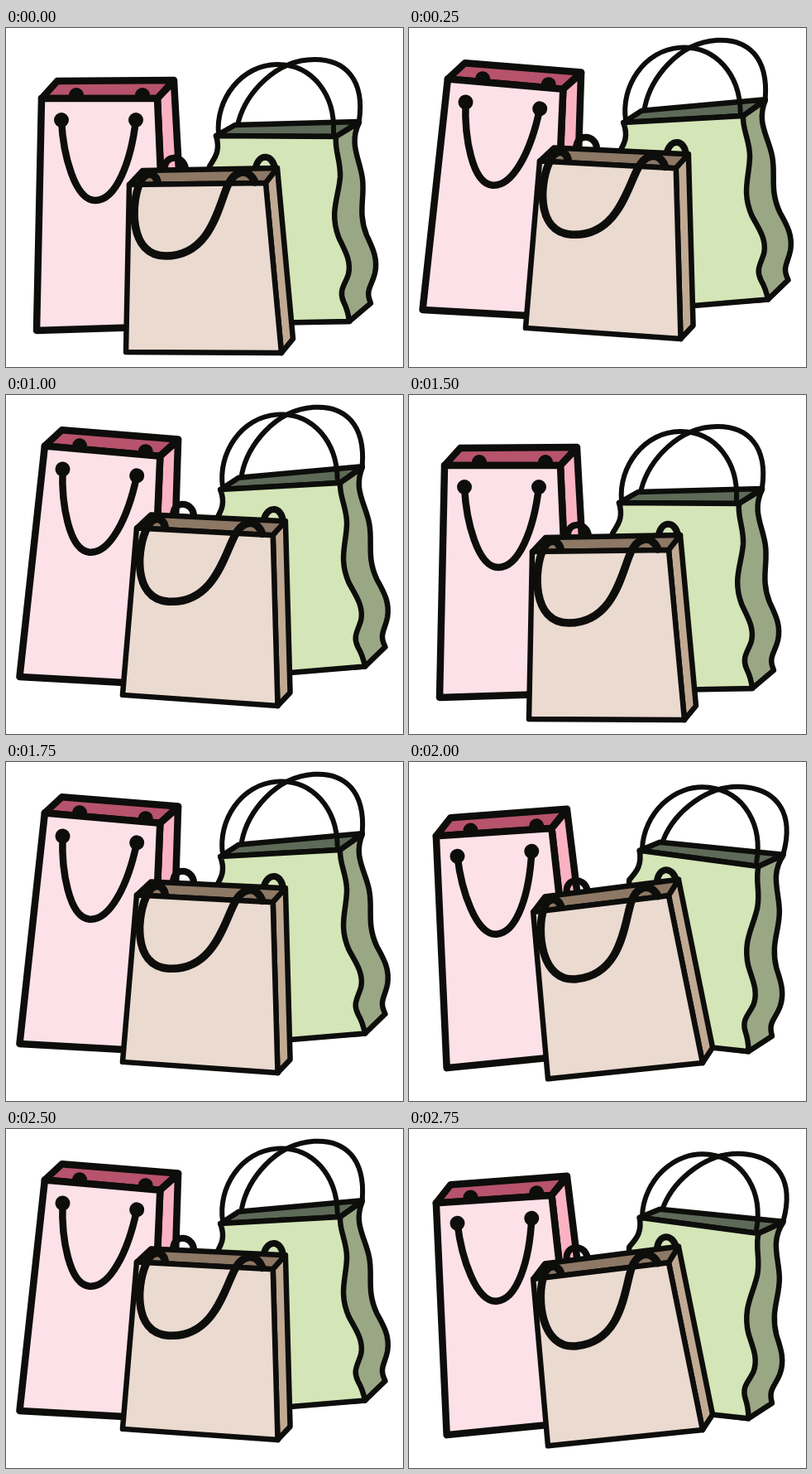
An HTML page that plays this animation: 480x409 px, repeating every 3000 ms.

```html
<!DOCTYPE html>
<html lang="en">
<head>
<meta charset="utf-8">
<title>Shopping bags</title>
<style>
  html, body { margin: 0; width: 100%; height: 100%; overflow: hidden; background: #fff; }
  svg { display: block; width: 100%; height: 100%; }
  .bag { stroke: #0d0d0b; stroke-linejoin: round; stroke-linecap: round; }
  .handle { fill: none; }
  .dot { fill: #0d0d0b; stroke: none; }
</style>
</head>
<body>
<svg viewBox="0 0 480 409">
  <g class="bag" id="pink" stroke-width="8.5">
    <path fill="#b7536c" d="M43 85L62 64L203 63L183 85Z"/>
    <circle class="dot" cx="85" cy="81" r="9"/>
    <circle class="dot" cx="165" cy="81" r="9"/>
    <path fill="#fbb3c4" d="M183 85L203 64L210 190L210 330L195 340Z"/>
    <path fill="#fde1e9" d="M43 85L183 85L195 360L37 365Z"/>
    <path class="handle" d="M67 111C69 152 83 208 108 208C133 208 151 162 157 111"/>
    <circle class="dot" cx="67" cy="111" r="9"/>
    <circle class="dot" cx="157" cy="111" r="9"/>
  </g>
  <g class="bag" id="green" stroke-width="6.5">
    <path fill="#5e6a58" d="M254 130L277 117L427 113L399 131Z"/>
    <path fill="#9aa785" d="M399 131L427 114C414 140 428 158 431 182C434 205 425 222 436 250C443 265 450 278 446 296C442 312 434 316 441 332L415 354L380 354L380 131Z"/>
    <path fill="#d4e5b7" d="M254 130L399 131C397 148 405 160 404 180C402 205 391 222 402 252C408 266 418 280 414 297C410 310 402 316 408 330C412 338 414 345 415 354L262 357L246 167C251 158 260 150 254 130Z"/>
    <path class="handle" stroke-width="6" d="M257 128C253 86 285 44 328 44C372 44 398 82 396 126"/>
    <path class="handle" stroke-width="6" d="M281 113C290 80 325 38 373 38C410 38 434 62 427 112"/>
  </g>
  <g class="bag" id="beige" stroke-width="6.5">
    <path class="handle" stroke-width="8" d="M192 170C191 153 214 152 217 169M302 168C306 151 322 152 325 169"/>
    <path fill="#8d7865" d="M149 189L165 172L328 169L314 187Z"/>
    <path fill="#c1aa94" d="M314 187L328 169L347 375L333 392Z"/>
    <path fill="#eadad0" d="M149 189L314 187L333 392L145 391Z"/>
    <path class="handle" stroke-width="9.5" d="M183 185C180 174 168 172 162 187C151 210 148 275 193 275C245 275 256 220 266 195C275 170 293 168 301 186"/>
  </g>
</svg>
<script>
const POSE_MS = 250;
// Each bag turns about its pivot; every pose is [dx, dy, degrees].
const bags = {
  pink:  { pivot: [67, 111],  poses: [[0, 0, 0], [1.5, -21.5, 5], [-8.5, 2.7, -3.85]] },
  green: { pivot: [399, 131], poses: [[0, 0, 0], [5, -25, -3.6],  [23.5, -5, 7.2]] },
  beige: { pivot: [333, 392], poses: [[0, 0, 0], [-4.5, -17, 3.7], [22, -29, -6.2]] }
};

function draw(now) {
  const pose = Math.floor(now / POSE_MS) % 3;
  for (const [id, { pivot, poses }] of Object.entries(bags)) {
    const [dx, dy, angle] = poses[pose];
    document.getElementById(id).setAttribute(
      "transform", `translate(${dx} ${dy}) rotate(${angle} ${pivot})`);
  }
}

const start = performance.now();
function tick() {
  draw(performance.now() - start);
  requestAnimationFrame(tick);
}
tick();
</script>
</body>
</html>
```
